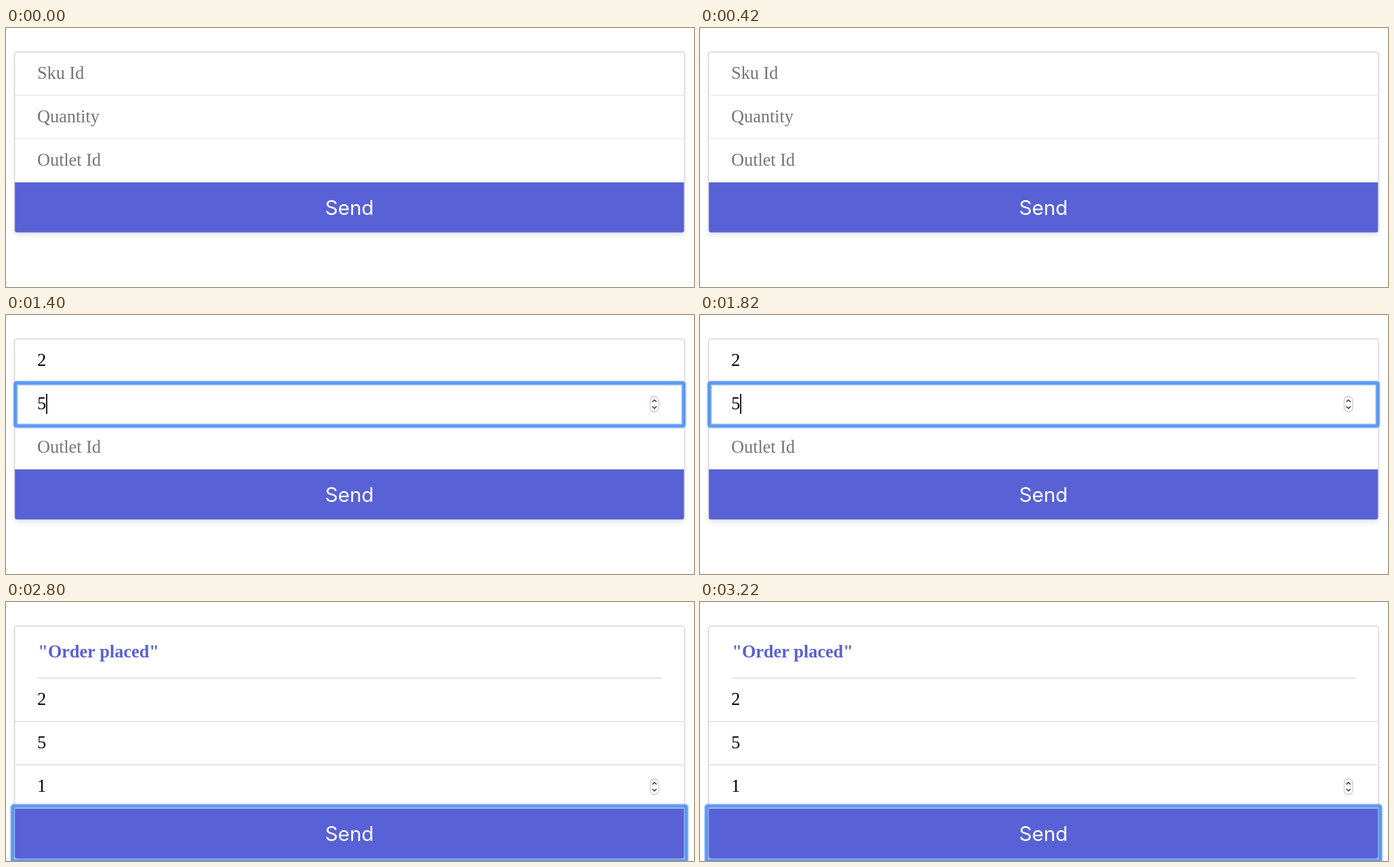
Recreate the animation shown at these times as an HTML page with a canvas. Size 1200 by 453 pixels, loop 3500 ms.

```html
<!DOCTYPE html>
<html lang="en">
<head>
<meta charset="utf-8">
<title>Order form</title>
<style>
  html, body { margin: 0; width: 100%; height: 100%; overflow: hidden; background: #fff; }
  canvas { display: block; width: 1200px; height: 453px; }
</style>
</head>
<body>
<canvas id="stage" width="1200" height="453"></canvas>
<script>
const ctx = document.getElementById('stage').getContext('2d');
const STEP = 700;
const ROW = 76;
const PURPLE = '#5861d5';
const SERIF = '31px "Liberation Serif", "Times New Roman", serif';
const SANS = '35px Inter, Roboto, sans-serif';
const labels = ['Sku Id', 'Quantity', 'Outlet Id'];
const values = ['2', '5', '1'];

function roundRect(x, y, w, h, r) {
  ctx.beginPath();
  ctx.roundRect(x, y, w, h, r);
}

function text(str, x, y, color, font = SERIF, align = 'left') {
  ctx.font = font;
  ctx.fillStyle = color;
  ctx.textAlign = align;
  ctx.fillText(str, x, y);
}

function rule(x1, x2, y, color) {
  ctx.fillStyle = color;
  ctx.fillRect(x1, y, x2 - x1, 1.8);
}

function card(bottom) {
  ctx.save();
  ctx.shadowColor = 'rgba(50, 60, 80, 0.13)';
  ctx.shadowBlur = 10;
  ctx.shadowOffsetY = 5;
  ctx.fillStyle = '#fff';
  roundRect(15, 42, 1168, bottom - 42, 4);
  ctx.fill();
  ctx.restore();
  ctx.strokeStyle = '#dcdcdc';
  ctx.lineWidth = 1.9;
  roundRect(15, 42, 1168.5, bottom - 42, 4);
  ctx.stroke();
}

// Translucent focus outline: wide soft halo under a narrower band.
function ring(x, y, w, h) {
  for (const [width, alpha] of [[9, 0.3], [5.4, 0.56]]) {
    ctx.strokeStyle = `rgba(26, 110, 240, ${alpha})`;
    ctx.lineWidth = width;
    roundRect(x, y, w, h, 2);
    ctx.stroke();
  }
}

function spinner(cy) {
  ctx.strokeStyle = '#c4c4c4';
  ctx.lineWidth = 1.3;
  roundRect(1123.5, cy - 13.5, 15, 27, 7);
  ctx.stroke();
  ctx.strokeStyle = '#444';
  ctx.lineWidth = 1.8;
  for (const dir of [-1, 1]) {
    ctx.beginPath();
    ctx.moveTo(1127.3, cy + dir * 4);
    ctx.lineTo(1131, cy + dir * 7.5);
    ctx.lineTo(1134.7, cy + dir * 4);
    ctx.stroke();
  }
}

function button(y) {
  ctx.fillStyle = PURPLE;
  roundRect(15.5, y, 1167, 87.5, [0, 0, 4, 4]);
  ctx.fill();
  text('Send', 599, y + 57, '#fff', SANS, 'center');
}

function draw(step) {
  const done = step === 4;
  const shift = done ? 91.4 : 0;
  const active = step - 1;

  ctx.fillStyle = '#fff';
  ctx.fillRect(0, 0, 1200, 453);
  card(357.5 + shift);

  if (done) {
    text('"Order placed"', 56, 97, PURPLE, 'bold ' + SERIF);
    rule(55, 1144, 132, '#dedede');
  }

  labels.forEach((label, i) => {
    const top = 42 + shift + i * ROW;
    const filled = i < step;
    if (i < 2) rule(16, 1182, top + 74.6, done ? '#e1e1e1' : '#ebebeb');
    text(filled ? values[i] : label, 54.5, Math.round(top + 47), filled ? '#000' : '#757575');
  });

  if (done) {
    spinner(323);
    ring(11.5, 357, 1175, 96);
    button(361.3);
    return;
  }

  button(270);
  if (active < 0) return;

  const y = 43 + active * ROW;
  ctx.fillStyle = '#fff';
  ctx.fillRect(16, y, 1166, 75);
  text(values[active], 54.5, y + 46, '#000');
  ring(16.5, y, 1165.5, 75);
  spinner(y + 37);
  if (active < 2) {
    ctx.fillStyle = '#000';
    ctx.fillRect(70, y + 19, 2, 35);
  }
}

function tick() {
  draw(Math.floor(performance.now() / STEP) % 5);
  requestAnimationFrame(tick);
}
tick();
</script>
</body>
</html>
```
